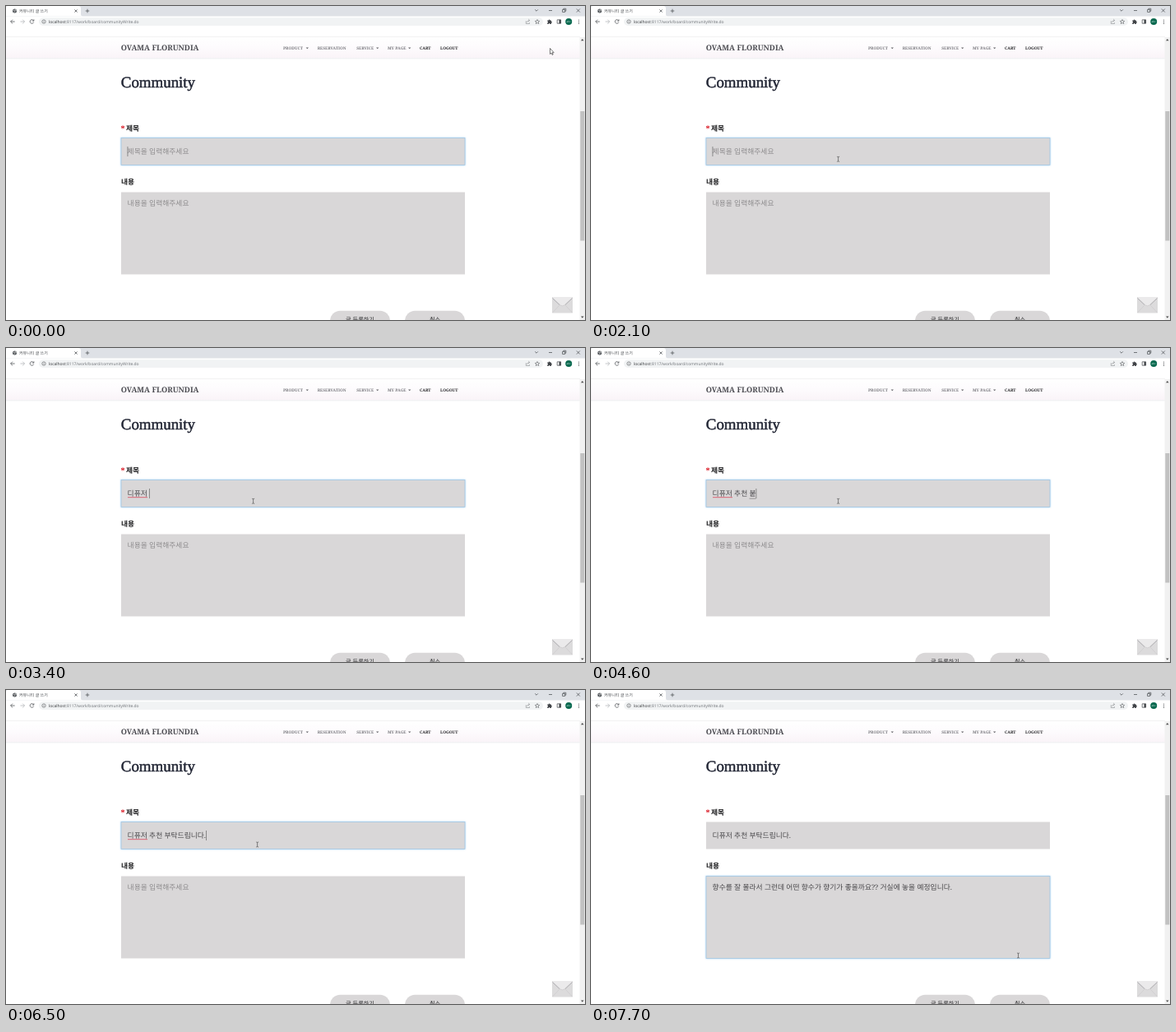
An HTML page that plays this animation: 704 by 382 pixels, repeating every 8000 ms.

```html
<!DOCTYPE html>
<html lang="ko">
<head>
<meta charset="utf-8">
<title>커뮤니티 글 쓰기</title>
<style>
html, body { margin: 0; width: 100%; height: 100%; overflow: hidden; background: #fff; }
svg { display: block; width: 704px; height: 382px; }
text { text-rendering: geometricPrecision; white-space: pre; }
.body { font: 8.78px "Noto Serif", "Noto Sans CJK KR", "Noto Sans CJK", serif; fill: #48474a; }
.hint { fill: #8d8b8d; }
.label { font-weight: 700; fill: #1c1c1e; }
.btn { font-size: 7.2px; fill: #2b2b2d; }
.brand { font: 700 9.2px "Noto Serif", serif; fill: #4a4a50; }
.menu { font: 700 4.85px "Noto Serif", serif; fill: #77777c; }
.strong { fill: #1b1b1e; }
.heading { font: 18.9px "Liberation Serif", serif; fill: #202433; stroke: #202433; stroke-width: .5; }
.ui { font: 4.95px "Open Sans", "Noto Sans CJK KR", "Noto Sans CJK", sans-serif; fill: #6b6f74; }
.line { fill: none; stroke: #55585c; stroke-width: .8; }
.field { fill: #d9d7d8; }
.focus { fill: #d9d7d8; stroke: #9cc3e2; stroke-width: .7; filter: drop-shadow(0 0 .8px #a9d3f5); }
</style>
</head>
<body>
<svg viewBox="0 0 704 382">
  <defs>
    <linearGradient id="navFill" x2="0" y2="1">
      <stop offset="0" stop-color="#fff"/>
      <stop offset=".5" stop-color="#fdfbfd"/>
      <stop offset="1" stop-color="#faf4f8"/>
    </linearGradient>
    <linearGradient id="navShade" x2="0" y2="1">
      <stop offset="0" stop-color="#efeff1"/>
      <stop offset="1" stop-color="#fff"/>
    </linearGradient>
  </defs>
  <rect width="704" height="382" fill="#fff"/>

  <!-- browser window -->
  <rect width="704" height="12.5" fill="#dee1e6"/>
  <path d="M0 12.5V2Q0 0 2 0H88Q91 0 91 3V10Q91 12.5 94 12.5Z" fill="#fff"/>
  <circle cx="10.5" cy="6" r="2.5" fill="#4f5357"/>
  <path d="M8.7 5.2l1.6 .4 .5 1-1 1.2M11 4l.3 1.2 1.4 .4" fill="none" stroke="#fff" stroke-width=".6"/>
  <text class="ui" x="16" y="7.9" style="font-size:5px;fill:#45484c">커뮤니티 글 쓰기</text>
  <path class="line" d="M83.4 4.4l3.2 3.2m0-3.2l-3.2 3.2M96.7 6h4.6M99 3.7v4.6"/>
  <path class="line" d="M643.2 4.4l1.8 1.8 1.8-1.8M660 5.5h4M676.6 4.4h3v3h-3zM677.8 4.2v-1h3v3h-1M693.8 3.5l4 4m0-4l-4 4"/>
  <rect x="40" y="14.2" width="613" height="9.8" rx="4.9" fill="#f1f3f4"/>
  <path class="line" d="M10.7 19H5.6M8 16.6L5.6 19 8 21.4"/>
  <path class="line" d="M17.5 19h5.1M20.2 16.6l2.4 2.4-2.4 2.4" style="stroke:#b4b7ba"/>
  <path class="line" d="M33.5 17.8a2.3 2.3 0 1 0 .2 1.8M33.9 16.3v1.8h-1.8"/>
  <circle class="line" cx="46" cy="19" r="2.2" style="stroke-width:.6"/>
  <path class="line" d="M46 18.7v1.4M46 17.6v.5" style="stroke-width:.6"/>
  <text class="ui" x="52" y="20.8"><tspan fill="#303236">localhost</tspan>:8117/work/board/communityWrite.do</text>
  <path class="line" d="M632.3 18.2v3.3h4.2v-1.3M633.6 20q.3-2.5 2.9-2.5M635.2 16l1.6 1.5-1.6 1.5" style="stroke-width:.6;stroke:#85888c"/>
  <path class="line" d="M646 16.5l.8 1.7 1.9.2-1.4 1.2.4 1.9-1.7-1-1.7 1 .4-1.9-1.4-1.2 1.9-.2z" style="stroke-width:.6"/>
  <path d="M658.3 17.4h1.4a.9.9 0 0 1 1.8 0h1.4v1.4a.9.9 0 0 1 0 1.8v1.3h-1.5a.8.8 0 0 0-1.6 0h-1.5v-1.5a.8.8 0 0 0 0-1.6z" fill="#3f4246"/>
  <path class="line" d="M670.2 16.8h4.4v4.4h-4.4z"/>
  <path d="M672.5 16.8h2.1v4.4h-2.1z" fill="#3f4246"/>
  <circle cx="684.2" cy="19" r="4" fill="#08694f"/>
  <text class="ui" x="684.2" y="20" text-anchor="middle" style="font-size:3.2px;fill:#d5e8e2">abc</text>
  <g fill="#4d5054"><circle cx="696.5" cy="17" r=".6"/><circle cx="696.5" cy="19.1" r=".6"/><circle cx="696.5" cy="21.2" r=".6"/></g>

  <!-- site header -->
  <path d="M0 37.5H698" stroke="#ebebed" stroke-width=".7"/>
  <rect y="38" width="698" height="25" fill="url(#navFill)"/>
  <rect y="63" width="698" height="2.5" fill="url(#navShade)"/>
  <text class="brand" x="139.7" y="53.9">OVAMA FLORUNDIA</text>
  <g class="menu">
    <text x="337" y="52.6">PRODUCT</text>
    <text x="378.7" y="52.6">RESERVATION</text>
    <text x="426.2" y="52.6">SERVICE</text>
    <text x="464" y="52.6">MY PAGE</text>
    <text class="strong" x="503" y="52.6">CART</text>
    <text class="strong" x="528" y="52.6">LOGOUT</text>
    <path d="M364.6 50.5h3.4l-1.7 1.7zM450 50.5h3.4l-1.7 1.7zM489 50.5h3.4l-1.7 1.7z" fill="#66666b"/>
  </g>

  <!-- form -->
  <text class="heading" x="139.8" y="98.9">Community</text>
  <text class="body label" x="139.6" y="153" style="font-size:10px;fill:#d8101c">*</text>
  <text class="body label" x="146" y="151.6">제목</text>
  <text class="body label" x="140" y="217.3">내용</text>
  <rect id="titleBox" x="140" y="160.5" width="418" height="33"/>
  <rect id="textBox" x="140" y="226.5" width="418" height="100"/>
  <text id="title" class="body" x="147.6" y="180.3" xml:space="preserve"></text>
  <text id="content" class="body" x="147.6" y="243.3" xml:space="preserve"></text>
  <path id="spell" d="M148 181.7H172" stroke="#d8475a" stroke-width=".8"/>
  <rect id="compose" y="182.8" height=".6" fill="#666"/>
  <rect id="caret" width=".7" height="12" fill="#666"/>
  <rect class="field" x="394" y="370.7" width="73" height="30" rx="12.5"/>
  <rect class="field" x="485" y="370.7" width="73" height="30" rx="12.5"/>
  <text class="body btn" x="430.5" y="383.8" text-anchor="middle">글 등록하기</text>
  <text class="body btn" x="521.5" y="383.8" text-anchor="middle">취소</text>

  <!-- mail button -->
  <rect x="664" y="354" width="25" height="19.5" fill="#dcdbdc"/>
  <path d="M664 354H689L679 363.5Q676.5 365.5 674 363.5Z" fill="#ebeaeb"/>
  <path d="M664.5 355.5L673 363.5M688.5 355.5L680 363.5" fill="none" stroke="#a5a4a7" stroke-width=".8"/>
  <path d="M673 363.5Q676.5 366.5 680 363.5M664.5 373L672.5 364.5M688.5 373L680.5 364.5" fill="none" stroke="#c9c8ca" stroke-width=".6"/>

  <!-- scrollbar -->
  <rect x="697.5" y="38" width="6.5" height="344" fill="#f1f1f1"/>
  <rect x="698.3" y="128" width="5" height="157.5" fill="#c1c1c1"/>
  <path d="M699 42.2h3.6l-1.8-2.2zM699 377.6h3.6l-1.8 2.2z" fill="#505050"/>

  <!-- pointer -->
  <path id="arrow" d="M0 0V7L1.6 5.6 2.7 8 3.7 7.5 2.7 5.2H4.7Z" fill="#fff" stroke="#222" stroke-width=".6"/>
  <path id="beam" d="M-1.5-3Q0-3 0-2.4Q0-3 1.5-3M0-2.5V2.5M-1.5 3Q0 3 0 2.4Q0 3 1.5 3" fill="none" stroke="#4a4a4a" stroke-width=".65"/>
</svg>
<script>
const LOOP = 8000, STEP = 100, LEFT = 147.6;
const BLUR = 6800, PASTE = 7200;
const $ = id => document.getElementById(id);
const body = "향수를 잘 몰라서 그런데 어떤 향수가 향기가 좋을까요?? 거실에 놓을 예정입니다.";

// bursts of typing: start time, settled text, then one state per step
const bursts = [
  [2500, "", "ㄷ"],
  [2700, "", "디|딮|디퓨|디퓾"],
  [3200, "디퓨", "저|저 |저 "],
  [3800, "디퓨저 ", "ㅊ|추|춫|추천|추천 |추천 ㅂ|추천 부"],
  [4600, "디퓨저 추천 ", "붙|부타|부탁|부탁ㄷ|부탁드|부탁들"],
  [5300, "디퓨저 추천 부탁", "드리|드립|드립ㄴ|드립니|드립닏|드립니다"],
  [6000, "디퓨저 추천 부탁드립니다", "."]
];
const typed = bursts.flatMap(([start, head, states]) =>
  states.split("|").map((s, i) => [start + i * STEP, head + s]));

// pointer: time, x, y
const path = [
  [900, 661.5, 51.5], [1000, 660, 54], [1100, 655, 62], [1200, 646, 74], [1300, 638, 83.5],
  [1400, 638, 83.5], [1600, 530, 150], [1800, 365, 215], [1900, 310, 224], [2000, 302, 200],
  [2100, 300.6, 186.3], [6400, 300.6, 186.3], [6500, 305.6, 188], [6700, 316, 218],
  [6800, 319, 233], [6900, 319.5, 235.6], [7300, 327, 237.5], [7400, 362, 250],
  [7600, 500, 314], [7700, 519.5, 323]
];

function pointerAt(t) {
  const i = path.findIndex(p => p[0] > t);
  if (i === 0) return path[0].slice(1);
  if (i < 0) return path[path.length - 1].slice(1);
  const [a, b] = [path[i - 1], path[i]];
  const k = (t - a[0]) / (b[0] - a[0]);
  return [a[1] + (b[1] - a[1]) * k, a[2] + (b[2] - a[2]) * k];
}

const inBox = (x, y, top, bottom) => x > 140 && x < 558 && y > top && y < bottom;
const show = (el, on) => el.setAttribute("visibility", on ? "visible" : "hidden");

function fill(el, value, hint) {
  el.textContent = value || hint;
  el.classList.toggle("hint", !value);
  return LEFT + (value ? el.getComputedTextLength() : 0);
}

function caretOn(t) {
  if (t < 2500) return t % 1000 < 500;
  return t < 6600 || (t >= BLUR && t < PASTE + 500);
}

function draw(t) {
  const inTitle = t < BLUR;
  const value = typed.reduce((s, [at, text]) => t >= at ? text : s, "");
  const titleEnd = fill($("title"), value, "제목을 입력해주세요");
  const textEnd = fill($("content"), t >= PASTE ? body : "", "내용을 입력해주세요");

  $("titleBox").setAttribute("class", inTitle ? "focus" : "field");
  $("textBox").setAttribute("class", inTitle ? "field" : "focus");
  show($("spell"), t >= 3400 && inTitle);

  const composing = value && !/[ .]$/.test(value);
  show($("compose"), composing);
  if (composing) {
    const w = $("title").getSubStringLength(value.length - 1, 1);
    $("compose").setAttribute("x", titleEnd - w);
    $("compose").setAttribute("width", w);
  }
  $("caret").setAttribute("x", inTitle ? titleEnd : textEnd);
  $("caret").setAttribute("y", inTitle ? 171 : 234);
  show($("caret"), caretOn(t));

  const [x, y] = pointerAt(t);
  const overText = inBox(x, y, 160, 194) || inBox(x, y, 226, 327);
  for (const id of ["arrow", "beam"]) {
    $(id).setAttribute("transform", `translate(${x} ${y})`);
    show($(id), (id === "beam") === overText);
  }
}

const begin = performance.now();
let last = -1;
function tick() {
  const t = Math.floor((performance.now() - begin) % LOOP / STEP) * STEP;
  if (t !== last) draw(last = t);
  requestAnimationFrame(tick);
}
tick();
</script>
</body>
</html>
```
